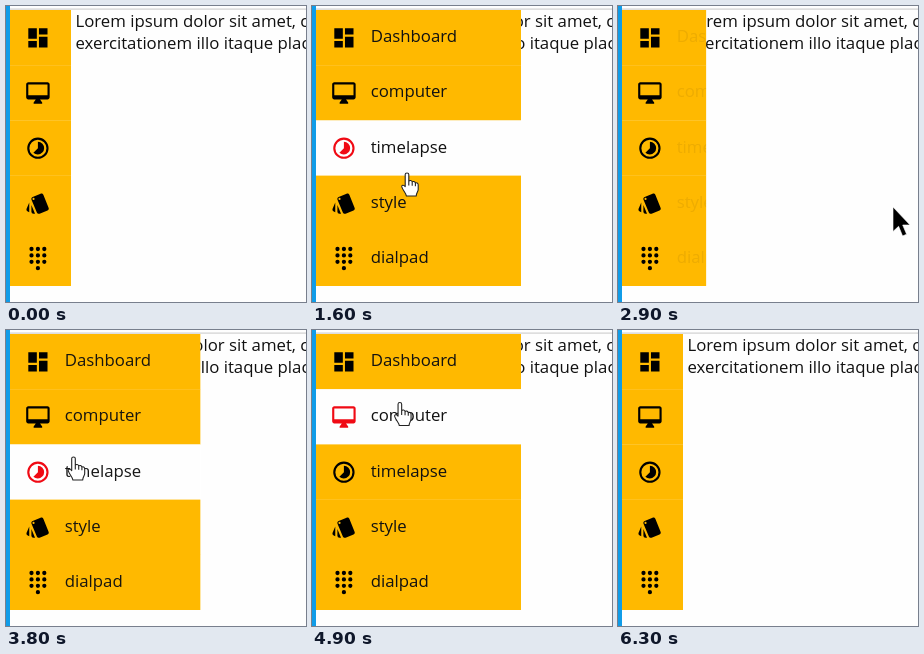
An HTML page that plays this animation: 300 by 296 pixels, repeating every 6.8 s.

```html
<!DOCTYPE html>
<html lang="en">
<head>
<meta charset="utf-8">
<title>Expanding sidebar</title>
<style>
  html, body { margin: 0; height: 100%; overflow: hidden; background: #fefefe; }
  #stage { display: block; width: 100vw; height: 100vh; }
  text { font: 16.8px "Open Sans", "Noto Sans", sans-serif; fill: #111; white-space: pre; }
  .row rect { fill: #ffb900; }
  .row.on rect { fill: #fefefe; }
  .row.on path { fill: #f00a14; }
</style>
</head>
<body>
<svg id="stage" viewBox="0 0 300 296">
  <rect width="300" height="296" fill="#fefefe"/>
  <rect y="2.5" width="300" height="1.2" fill="#d2d2d2"/>
  <text x="69.5" y="21">Lorem ipsum dolor sit amet, consectetur</text>
  <text x="69.5" y="43">exercitationem illo itaque placeat</text>
  <svg id="bar" x="4" y="4" width="61" height="276" overflow="hidden"></svg>
  <rect width="4" height="296" fill="#109ce8"/>
  <g id="cursor">
    <path id="arrow" d="M0 0V24.5L5.6 19.3L9.6 29L13.6 27.2L9.7 18H17Z" fill="#000" stroke="#fff" stroke-width=".6"/>
    <path id="hand" d="M-1.8 1.6C-1.8-.6 1.8-.6 1.8 1.6V8.2C2.4 7 5 7.2 5.2 9C6 8 8.2 8.4 8.4 10.2C9.4 9.3 11.2 10 11.2 11.8V16.5C11.2 18.5 9.4 19.8 9.2 23H-.6C-.8 20.2-4.2 17.4-5.2 13.9C-5.6 12-3.4 11.4-1.8 13.6ZM1.8 8.2V12.4M5.2 9V12.8M8.4 10.2V13.2"
      fill="#fff" stroke="#222" stroke-width="1.1" stroke-linejoin="round"/>
  </g>
</svg>
<script>
const LOOP = 6800, STEP = 100, ROW = 55.2, CLOSED = 61, OPEN = 205, FADE = 500;

const dot = (x, y) => `M${x - 2} ${y}a2 2 0 1 0 4 0a2 2 0 1 0-4 0z`;
const dots = [3, 9, 15].flatMap(y => [6, 12, 18].map(x => dot(x, y))).join("") + dot(12, 21);

const items = [
  ["Dashboard", "M3 13h8V3H3zM3 21h8v-6H3zM13 21h8V11h-8zM13 3v6h8V3z"],
  ["computer", "M21 2H3c-1.1 0-2 .9-2 2v12c0 1.1.9 2 2 2h7l-2 3v1h8v-1l-2-3h7c1.1 0 2-.9 2-2V4c0-1.1-.9-2-2-2zm0 12H3V4h18z"],
  ["timelapse", "M16.24 7.76A6 6 0 0 0 12 6v6l-4.24 4.24a6 6 0 0 0 8.48-8.48zM12 2a10 10 0 1 0 0 20a10 10 0 1 0 0-20zm0 18a8 8 0 1 1 0-16a8 8 0 1 1 0 16z"],
  ["style", "M2.5 19.7l1.4.5v-9l-2.5 5.8c-.4 1 .1 2.2 1.1 2.7zM22 16L17.1 4c-.4-1-1.6-1.5-2.6-1.1L7.1 6C6.1 6.4 5.6 7.5 6 8.6l5 11.9c.4 1 1.6 1.5 2.6 1.1l7.4-3c1-.4 1.5-1.6 1-2.6zM7.9 8.8a1 1 0 1 1 0-2a1 1 0 1 1 0 2zM5.9 19.8a2 2 0 0 0 2 2h1.4l-3.4-8.4z"],
  ["dialpad", dots]
];

// Times at which the pointer enters and leaves the sidebar
const visits = [[450, 2630], [3490, 5740]];

// Pointer path: time, x, y
const path = [
  [100, 288, 130], [400, 110, 60], [500, 50, 36], [800, 80, 34], [1000, 85, 60],
  [1300, 90, 115], [1400, 90, 115], [1600, 95, 167], [1800, 94, 188], [1900, 94, 188],
  [2300, 100, 240], [2400, 100, 240], [2600, 190, 232], [2700, 235, 222],
  [2900, 275, 201], [3100, 258, 185], [3400, 90, 150], [3500, 50, 133],
  [3800, 67.5, 127], [4400, 91, 44], [4500, 90, 40], [4600, 90, 40],
  [5300, 85, 116], [5600, 172, 122], [5700, 200, 140], [5800, 215, 160],
  [6000, 236, 185], [6200, 269, 200], [6300, 280, 205]
];

const $ = id => document.getElementById(id);
const bar = $("bar"), cursor = $("cursor");

bar.innerHTML = items.map(([name, icon], i) => `
  <g class="row" transform="translate(0 ${i * ROW})">
    <rect width="${OPEN}" height="${ROW + .2}"/>
    <path d="${icon}" fill-rule="evenodd" transform="translate(15.1 15) scale(1.067)"/>
    <text x="54.7" y="32.3">${name}</text>
  </g>`).join("");
const rows = [...bar.querySelectorAll(".row")];
const labels = bar.querySelectorAll("text");

const clamp = v => Math.max(0, Math.min(1, v));
const bezier = (a, b, s) => 3 * a * s * (1 - s) ** 2 + 3 * b * s * s * (1 - s) + s ** 3;

// The CSS "ease" curve, solved by bisection
function ease(x) {
  let lo = 0, hi = 1;
  for (let i = 0; i < 24; i++) {
    const mid = (lo + hi) / 2;
    if (bezier(.25, .25, mid) < x) lo = mid; else hi = mid;
  }
  return bezier(.1, 1, lo);
}
const ramp = (t, start) => ease(clamp((t - start) / FADE));

function pointer(t) {
  const i = path.findIndex(p => p[0] > t);
  if (i < 1) return null;
  const [t0, x0, y0] = path[i - 1], [t1, x1, y1] = path[i];
  const k = (t - t0) / (t1 - t0);
  return [x0 + (x1 - x0) * k, y0 + (y1 - y0) * k];
}

function draw(t) {
  let open = 0;
  for (const [enter, leave] of visits) open += ramp(t, enter) - ramp(t, leave);
  open = clamp(open);
  bar.setAttribute("width", CLOSED + (OPEN - CLOSED) * open);
  const fade = open * open * (3 - 2 * open);
  labels.forEach(label => label.setAttribute("opacity", fade));

  const inside = visits.some(([enter, leave]) => t >= enter && t < leave);
  const pos = pointer(t);
  const hovered = inside && pos ? Math.floor((pos[1] - 4) / ROW) : -1;
  rows.forEach((row, i) => row.classList.toggle("on", i === hovered));

  cursor.style.display = pos ? "" : "none";
  if (pos) cursor.setAttribute("transform", `translate(${pos})`);
  $("hand").style.display = inside ? "" : "none";
  $("arrow").style.display = inside ? "none" : "";
}

const start = performance.now();
function tick() {
  const t = (performance.now() - start) % LOOP;
  draw(Math.floor(t / STEP) * STEP);
  requestAnimationFrame(tick);
}
tick();
</script>
</body>
</html>
```
